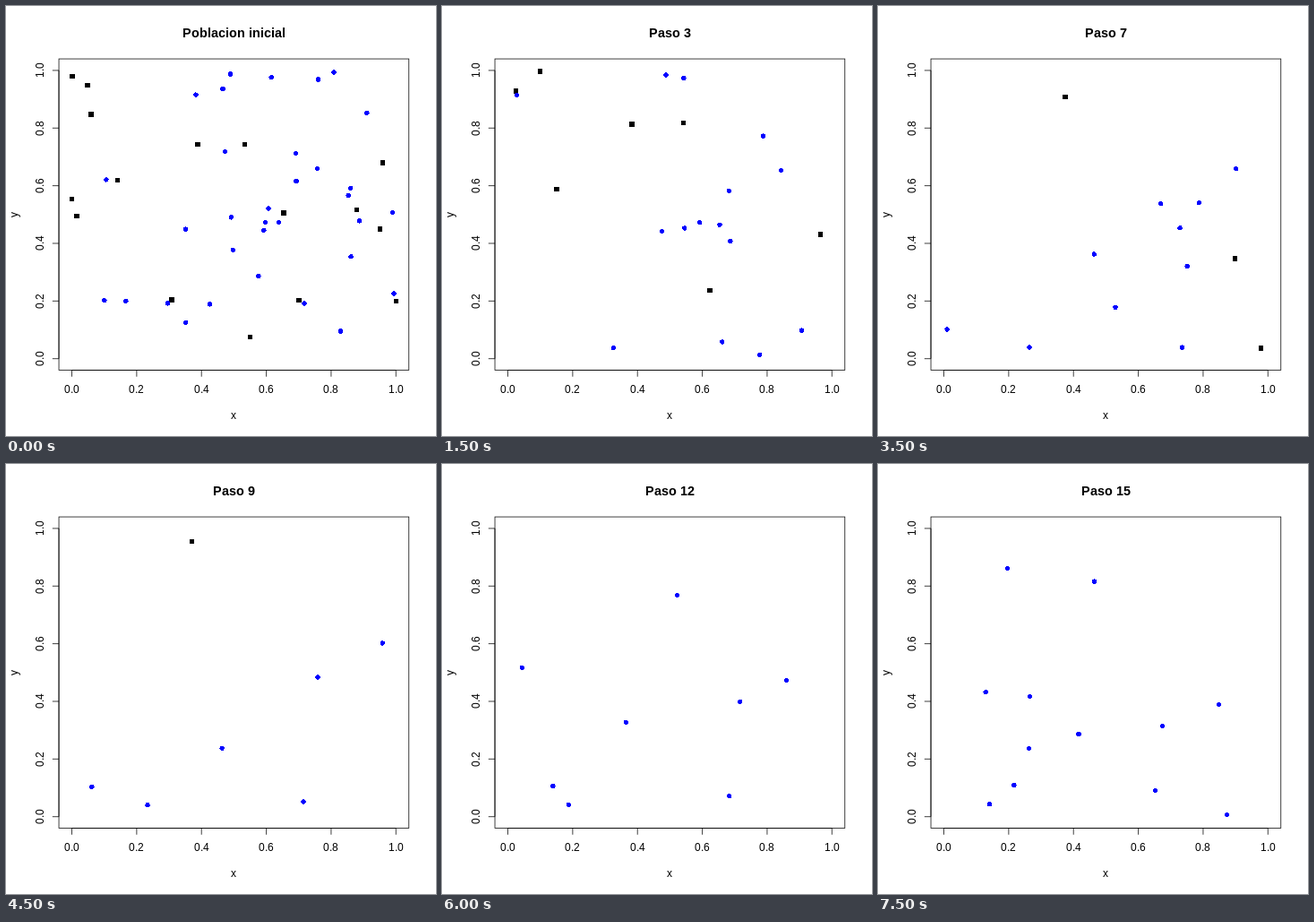
An HTML page with a canvas for the animation above (8000 ms loop, 480x480 px).

```html
<!DOCTYPE html>
<html lang="es">
<head>
<meta charset="utf-8">
<style>
html, body { margin: 0; width: 100%; height: 100%; overflow: hidden; background: #fff; }
canvas { display: block; }
</style>
</head>
<body>
<canvas id="plot" width="480" height="480"></canvas>
<script>
const ctx = document.getElementById('plot').getContext('2d');
const BOX = { left: 59.04, top: 59.04, right: 449.76, bottom: 406.56 };
const X0 = 73.51, W = 361.78, Y1 = 71.91, H = 321.78;
const STEP = 500, STEPS = 16, R = 2.7, CROWD = 36;
const BLUE = '#00f', BLACK = '#000';
const agents = [];

// Each agent: x, y at its first step, then its velocity per step.
function add(color, first, last, ...list) {
  for (const [x, y, vx = 0, vy = 0] of list) agents.push({ color, first, last, x, y, vx, vy });
}

// Agents that live for several steps.
add(BLUE, 0, 15, [348.5, 82, -11.93, -9.62], [366, 73.9, -3.77, -2.08], [373.5, 363, 9.35, -.3]);
add(BLUE, 0, 7, [324, 195.5, -1.2, 3.6], [289.5, 241.5, 6.8, .9],
  [304.5, 241.5, 5.8, 7], [293, 226, -7.4, 7.3]);
add(BLUE, 0, 4, [242, 92.5, 9.3, -4], [250.5, 76, -.2, .3]);
add(BLACK, 0, 10, [214, 154.5, -.72, -7.56]);
add(BLACK, 0, 8, [95, 121, -4.2, -8.7], [79, 234.5, -6, 6.8]);
add(BLACK, 0, 4, [327, 328.5, -9.3, -3.7]);
add(BLACK, 1, 4, [127.5, 73.5, -9, -.25], [133.5, 185, -2.75, 9.75], [248, 131, 10.75, -.25]);
add(BLUE, 1, 15, [202.5, 381.9, -5.57, -.15]);
add(BLUE, 1, 6, [305, 246.5, -8.6, -2.4]);
add(BLUE, 2, 15, [383.6, 174.4, -5.08, 9.08], [348.2, 136, 10.29, 9.13]);
add(BLUE, 2, 6, [241.5, 252.5, 4, -1]);
add(BLUE, 3, 3, [83.5, 99.5]);
add(BLACK, 5, 6, [324, 275]);
add(BLUE, 10, 15, [387.2, 223.5, -1.33, 9], [276.5, 156.9, -7, -5.17]);
add(BLUE, 13, 15, [375.5, 385.5, 7, 3]);
add(BLUE, 14, 15, [168.5, 317.5], [224, 301.5], [144.5, 116.5]);

// The rest of the first population is scattered at random; half of it dies at every step.
let seed = 11;
const random = () => (seed = seed * 16807 % 2147483647) / 2147483647;
for (let i = 0; i < CROWD; i++) {
  const point = [X0 + W * random(), Y1 + H * random(), 20 * random() - 10, 20 * random() - 10];
  add(i % 3 ? BLUE : BLACK, 0, Math.max(0, i % 4 - 1), point);
}

const wrap = (v, low, size) => low + ((v - low) % size + size) % size;

// Unsmoothed marks, filled in whole pixels.
function square(x, y) {
  const left = Math.round(x - R), top = Math.round(y - R);
  ctx.fillRect(left, top, Math.round(x + R) - left, Math.round(y + R) - top);
}

function disc(x, y) {
  for (let row = Math.round(y - R); row < Math.round(y + R); row++) {
    const half = Math.sqrt(Math.max(0, R * R - (row + .5 - y) ** 2));
    const left = Math.round(x - half);
    ctx.fillRect(left, row, Math.round(x + half) - left, 1);
  }
}

function line(x1, y1, x2, y2) {
  ctx.beginPath();
  ctx.moveTo(x1, y1);
  ctx.lineTo(x2, y2);
  ctx.stroke();
}

// Centred text whose letters advance by whole pixels.
function label(text, x, y, turned) {
  const advance = c => Math.round(ctx.measureText(c).width);
  const half = [...text].reduce((sum, c) => sum + advance(c), 0) / 2;
  ctx.save();
  if (turned) {
    ctx.translate(x, Math.round(y + half));
    ctx.rotate(-Math.PI / 2);
  } else {
    ctx.translate(Math.round(x - half), y);
  }
  let pen = 0;
  for (const c of text) {
    ctx.fillText(c, pen, 0);
    pen += advance(c);
  }
  ctx.restore();
}

function axes() {
  const { left, top, right, bottom } = BOX;
  ctx.fillStyle = ctx.strokeStyle = BLACK;
  ctx.lineWidth = .75;
  ctx.strokeRect(left, top, right - left, bottom - top);
  line(X0, bottom, X0 + W, bottom);
  line(left, Y1, left, Y1 + H);
  ctx.font = '12px "Liberation Sans", Arial, sans-serif';
  for (let i = 0; i <= 5; i++) {
    const x = X0 + W * i / 5, y = Y1 + H * (1 - i / 5), text = (i / 5).toFixed(1);
    line(x, bottom, x, bottom + 7.2);
    line(left, y, left - 7.2, y);
    label(text, x, 432);
    label(text, 42, y, true);
  }
  label('x', 254.4, 461);
  label('y', 13, 232.8, true);
}

function draw(step) {
  ctx.fillStyle = '#fff';
  ctx.fillRect(0, 0, 480, 480);
  axes();
  ctx.font = 'bold 14.4px "Liberation Sans", Arial, sans-serif';
  label(step ? 'Paso ' + step : 'Poblacion inicial', 254.4, 35);
  for (const a of agents) {
    if (step < a.first || step > a.last) continue;
    const age = step - a.first;
    const mark = a.color === BLUE ? disc : square;
    ctx.fillStyle = a.color;
    mark(wrap(a.x + a.vx * age, X0, W), wrap(a.y + a.vy * age, Y1, H));
  }
}

const start = performance.now();
let shown = -1;
function tick() {
  const step = Math.floor((performance.now() - start) / STEP) % STEPS;
  if (step !== shown) draw(shown = step);
  requestAnimationFrame(tick);
}
tick();
</script>
</body>
</html>
```
